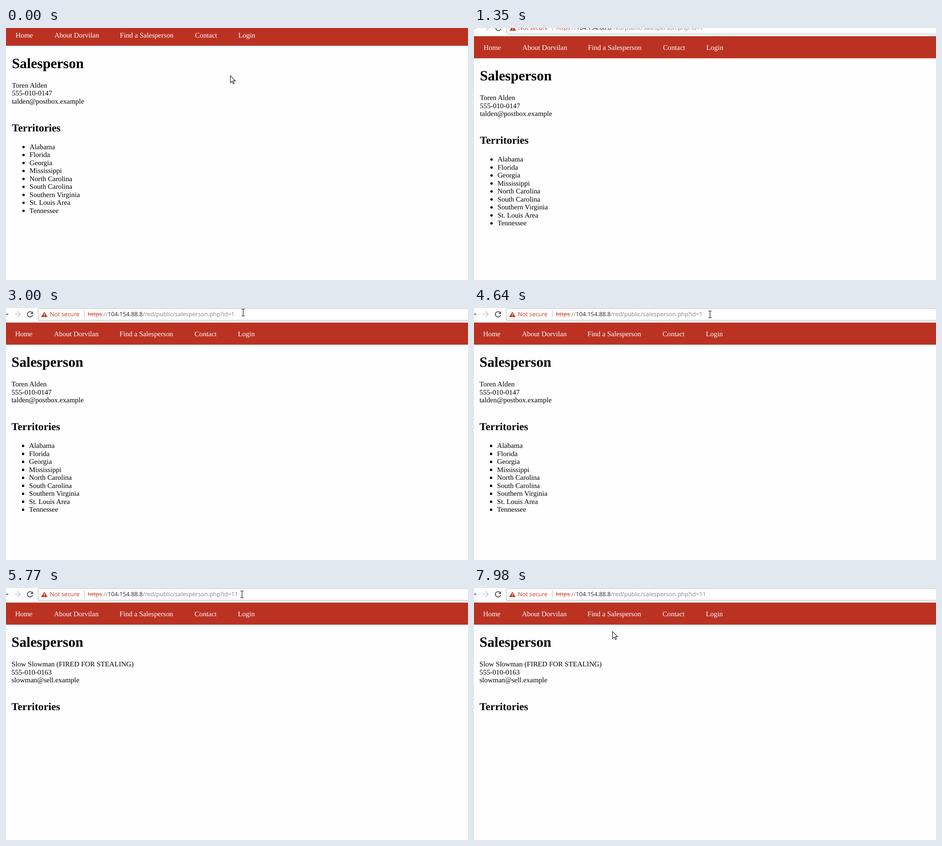
These frames come from a looping animation (1012x553 px, 8 s). An HTML page:

```html
<!DOCTYPE html>
<html lang="en">
<head>
<meta charset="utf-8">
<title>Salesperson page</title>
<style>
  html, body { margin: 0; width: 100%; height: 100%; overflow: hidden; background: #fefefe; }
  svg { display: block; }
  text { text-rendering: geometricPrecision; white-space: pre; }
  #page text { font: 15.56px "Liberation Serif", "Times New Roman", serif; }
  #page .h1 { font-size: 31.1px; font-weight: bold; }
  #page .h2 { font-size: 23.34px; font-weight: bold; }
  #nav text { fill: #fff; }
  #bar text, #popup text { font: 12.88px "Open Sans", "Noto Sans", sans-serif; }
  .warn { fill: #c53929; }
  .scheme { fill: #cb5a45; text-decoration: line-through; }
  .host { fill: #222; }
  .path { fill: #858585; }
  .selected tspan { fill: #fff; }
</style>
</head>
<body>
<svg width="1012" height="553" viewBox="0 0 1012 553">
  <rect width="1012" height="553" fill="#fefefe"/>
  <g id="view">
    <g id="page">
      <rect x="-2" width="1016" height="48.5" fill="#bb3223"/>
      <g id="nav"></g>
      <text class="h1" x="12" y="97.3">Salesperson</text>
      <g id="details"></g>
      <text class="h2" x="12" y="236.4">Territories</text>
      <g id="territories"></g>
    </g>

    <g id="bar" transform="translate(0 -32)">
      <path d="M-2 13.5H5" stroke="#5a5a5a" stroke-width="2"/>
      <path d="M19 13.5H31M25.5 7.5l6 6-6 6" fill="none" stroke="#d2d2d2" stroke-width="1.9"/>
      <g id="reload">
        <path d="M56.7 9.8A5.8 5.8 0 1 0 58.2 15.4" fill="none" stroke="#555" stroke-width="2"/>
        <path d="M59.3 7v6h-6z" fill="#555"/>
      </g>
      <path id="stop" d="M48 9l9.5 9.5M57.5 9l-9.5 9.5" stroke="#555" stroke-width="2"/>
      <rect x="70.5" y=".5" width="960" height="26.5" rx="2" fill="#fff" stroke="#b4b4b4"/>
      <path d="M84 8l7.2 12H76.8z" class="warn"/>
      <path d="M84 11.8v4M84 16.9v1.6" stroke="#fff" stroke-width="1.5"/>
      <text class="warn" x="96" y="18.4">Not secure</text>
      <path d="M171.5 6v15" stroke="#c3b3b1"/>
      <rect id="selection" x="179" y="4" width="323" height="18" fill="#3390ff"/>
      <text id="url" x="179" y="18.4"><tspan class="scheme">https</tspan><tspan class="path">://</tspan><tspan class="host">104.154.88.8</tspan><tspan class="path">/red/public/salesperson.php?id=<tspan id="query">1</tspan></tspan></text>
      <rect id="caret" y="3" width="1" height="18" fill="#000"/>
    </g>

    <g id="popup">
      <rect x="-2" y="-4" width="1016" height="59.5" fill="#fff" stroke="#bbb"/>
      <rect x="-2" y="-1" width="1016" height="27" fill="#eee"/>
      <text x="100" y="17" fill="#3367d6">https://104.154.88.8/red/public/salesperson.php?id=11</text>
      <text x="100" y="45" fill="#3367d6">https://104.154.88.8/red/public/salesperson.php</text>
    </g>
  </g>

  <path id="arrow" d="M.5 .5V16.2L4.2 12.8 6.7 18.3 9 17.3 6.6 11.9H11.5Z" fill="#fff" stroke="#111" stroke-width="1.1"/>
  <path id="beam" d="M-3.5-7.5H-1Q0-7.5 0-6.5V6.5Q0 7.5-1 7.5H-3.5M3.5-7.5H1Q0-7.5 0-6.5V6.5Q0 7.5 1 7.5H3.5" fill="none" stroke="#111" stroke-width="1.2"/>
</svg>
<script>
const $ = id => document.getElementById(id);
const LOOP = 8000, LINE = 17.5;

function addText(parent, x, y, content) {
  const node = document.createElementNS("http://www.w3.org/2000/svg", "text");
  node.setAttribute("x", x);
  node.setAttribute("y", y);
  node.textContent = content;
  parent.append(node);
  return node;
}

[[20, "Home"], [105, "About Dorvilan"], [248.5, "Find a Salesperson"], [413, "Contact"], [508, "Login"]]
  .forEach(([x, label]) => addText($("nav"), x, 30.2, label));

["Alabama", "Florida", "Georgia", "Mississippi", "North Carolina", "South Carolina",
  "Southern Virginia", "St. Louis Area", "Tennessee"].forEach((name, i) => {
  const y = 275.3 + i * LINE;
  addText($("territories"), 50.5, y, name);
  const dot = document.createElementNS("http://www.w3.org/2000/svg", "circle");
  dot.setAttribute("cx", 37.4);
  dot.setAttribute("cy", y - 4.6);
  dot.setAttribute("r", 2.6);
  $("territories").append(dot);
});

const people = [
  ["Toren Alden", "555-010-0147", "talden@postbox.example"],
  ["Slow Slowman (FIRED FOR STEALING)", "555-010-0163", "slowman@sell.example"]
];
const detailLines = [0, 1, 2].map(i => addText($("details"), 12, 140.4 + i * LINE, ""));

const arrow = (x, y) => ({ arrow: [x, y], beam: null });
const beam = (x, y) => ({ arrow: null, beam: [x, y] });

// Each step holds until the next; only the changed properties are listed.
const steps = [
  [0, { view: [1, -9.5], person: 0, query: "1", caret: 0, selected: false, popup: false, loading: false, ...arrow(491, 104) }],
  [120, arrow(486, 86)],
  [260, arrow(497, 48)],
  [400, arrow(519, 8)],
  [650, { arrow: null }],
  [1080, { view: [1, 6] }],
  [1220, { view: [1, 18] }],
  [1360, { view: [0, 27] }],
  [1500, { view: [0, 33] }],
  [1640, { view: [0, 35] }],
  [2050, { view: [0, 33] }],
  [2190, { view: [0, 32] }],
  [2480, beam(528, 5)],
  [2600, beam(522, 10)],
  [3000, beam(519.5, 10)],
  [3140, beam(518, 12)],
  [3280, beam(517, 14)],
  [3400, { selected: true }],
  [3540, arrow(518, 24)],
  [3680, arrow(514, 27)],
  [3960, beam(517, 14)],
  [4110, { selected: false, caret: 502 }],
  [4640, { caret: 0 }],
  [5200, { query: "11", caret: 509.5, popup: true }],
  [5470, { caret: 0, popup: false, loading: true }],
  [5610, { person: 1 }],
  [5770, { loading: false }],
  [6330, arrow(390, 100)],
  [6470, arrow(205, 215)],
  [6600, arrow(82, 280)],
  [6880, arrow(59, 248)],
  [7020, arrow(74, 185)],
  [7160, arrow(150, 141)],
  [7300, arrow(232, 160)],
  [7430, arrow(277, 205)],
  [7860, arrow(292, 142)],
  [7980, arrow(303, 95)]
];

const show = (id, on) => { $(id).style.display = on ? "" : "none"; };

function place(id, point) {
  show(id, point);
  if (point) $(id).setAttribute("transform", `translate(${point})`);
}

function render(state) {
  place("view", state.view);
  place("arrow", state.arrow);
  place("beam", state.beam);
  people[state.person].forEach((line, i) => { detailLines[i].textContent = line; });
  show("territories", state.person === 0);
  $("query").textContent = state.query;
  $("url").classList.toggle("selected", state.selected);
  show("selection", state.selected);
  show("popup", state.popup);
  show("stop", state.loading);
  show("reload", !state.loading);
  show("caret", state.caret);
  $("caret").setAttribute("x", state.caret);
}

const start = performance.now();
let shown = -1;

function tick() {
  const t = Math.max(0, performance.now() - start) % LOOP;
  const count = steps.filter(([time]) => time <= t).length;
  if (count !== shown) {
    shown = count;
    render(Object.assign({}, ...steps.slice(0, count).map(([, change]) => change)));
  }
  requestAnimationFrame(tick);
}
tick();
</script>
</body>
</html>
```
